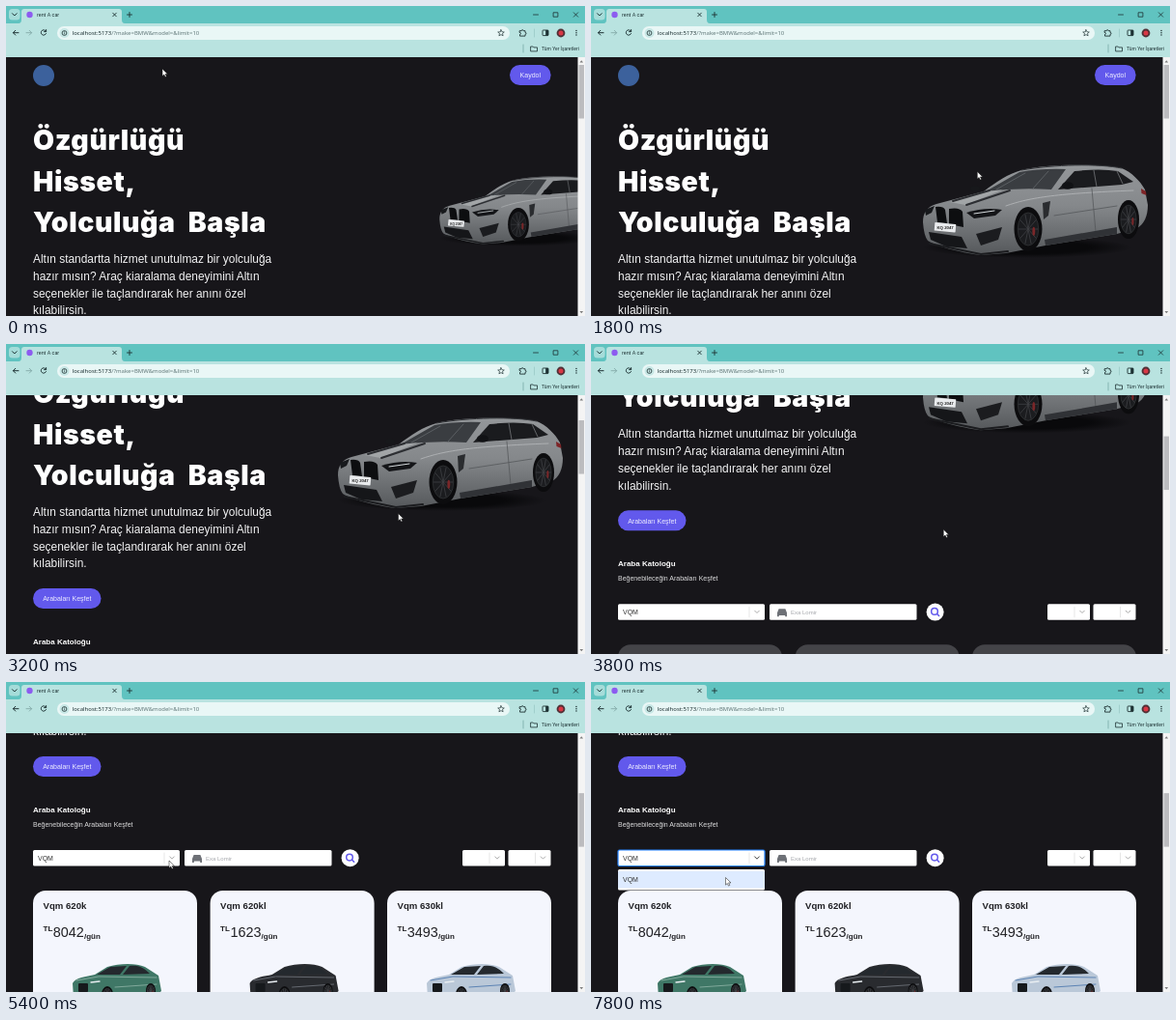
Animation, 600 px wide and 321 px high, one loop 8 s. Source, as an HTML page:

```html
<!DOCTYPE html>
<html lang="tr">
<head>
<meta charset="utf-8">
<title>rent A car</title>
<style>
  html, body { margin: 0; width: 100%; height: 100%; overflow: hidden; background: #17161a; }
  svg { display: block; width: 100%; height: 100%; }
  text { font-family: "Liberation Sans", Arial, sans-serif; white-space: pre; }
  .hero { font-family: Inter, sans-serif; font-weight: 900; letter-spacing: .02em; word-spacing: .24em; }
  .ui { font-family: Roboto, sans-serif; }
  .url { font-family: "Noto Sans", sans-serif; }
  .bold { font-weight: 700; }
  .line { fill: none; stroke-linecap: round; stroke-linejoin: round; }
</style>
</head>
<body>
<svg id="stage" viewBox="0 0 600 321" preserveAspectRatio="none"></svg>
<script>
const LOOP = 8000, STEP = 200;
const DARK = '#17161a', PURPLE = '#6259ec', INK = '#1d3133';

const rect = (x, y, w, h, fill, r = 0, more = '') =>
  `<rect x="${x}" y="${y}" width="${w}" height="${h}" rx="${r}" fill="${fill}" ${more}/>`;
const circle = (x, y, r, fill, more = '') => `<circle cx="${x}" cy="${y}" r="${r}" fill="${fill}" ${more}/>`;
const oval = (x, y, rx, ry, fill, more = '') =>
  `<ellipse cx="${x}" cy="${y}" rx="${rx}" ry="${ry}" fill="${fill}" ${more}/>`;
const shape = (d, fill, more = '') => `<path d="${d}" fill="${fill}" ${more}/>`;
const line = (d, color = INK, width = .9) =>
  `<path class="line" d="${d}" stroke="${color}" stroke-width="${width}"/>`;
const text = (s, x, y, size, fill, cls = '', anchor = 'start') =>
  `<text x="${x}" y="${y}" font-size="${size}" fill="${fill}" class="${cls}" text-anchor="${anchor}">${s}</text>`;
const chevron = (x, y, color, width = 1) => line(`M${x - 2.3} ${y - 1.1}l2.3 2.3 2.3-2.3`, color, width);

function wheel(x, y, rx, ry) {
  let spokes = '';
  for (let i = 0; i < 10; i++) {
    const a = i * Math.PI / 5;
    spokes += `M${x} ${y}l${Math.cos(a) * rx * .68} ${Math.sin(a) * ry * .68}`;
  }
  return oval(x, y, rx, ry, '#0c0c0e') + oval(x, y, rx * .74, ry * .74, '#1b1c1f', 'stroke="#3c3e41" stroke-width=".6"') +
    line(spokes, '#3f4144', .8) + oval(x + rx * .4, y + ry * .1, rx * .1, ry * .2, '#7a2729');
}

function heroCar() {
  return oval(452, 250, 108, 11, 'url(#shadow)') +
    shape('M344 224C344 214 348 208 358 205L407 192C420 182 432 174 446 170C470 164 520 163 550 168C560 172 569 181 574 190L577 206C577 218 573 226 566 230L545 236 471 248 430 256 404 258C380 255 356 248 349 243Q345 238 344 224Z', 'url(#paint)') +
    shape('M409 192L444 172Q466 168 492 169L477 190Q442 188 409 192Z', '#3a3d41') +
    line('M420 190L450 173M458 189L474 171', '#5b5f63', 1) +
    shape('M484 190L501 171Q528 168 546 171L562 182 550 185Z', '#1a1b1e') +
    line('M521 170l3 17M545 171l6 13', '#6b6e71', .9) + line('M446 170C480 164 526 163 550 168', '#34363a', 1) +
    shape('M372 203L409 192 427 190 388 206Z', '#b4b7b9', 'opacity=".6"') +
    line('M375 202L413 191M389 206L434 191', '#2c2e32', 1.9) +
    line('M430 207C455 198 485 194 562 191', '#b6b9bb', .8) + line('M480 217L545 207M519 189l4 45', '#4f5255', .7) +
    shape('M470 242L545 229 545 236 471 248Z', '#303236') +
    shape('M468 204l8-2-2 15-5 4Z', '#2a2c2f') +
    shape('M389 214Q408 208 426 211L419 217 397 220Z', '#141518') + line('M397 215L418 212', '#d5dadd', 1) +
    shape('M346 211l10-4-3 7-6 3Z', '#17191c') +
    shape('M357 208Q365 207 367 211L369 225 359 224ZM371 210Q382 208 385 213L386 229 371 226Z', '#0d0e10') +
    shape('M350 234L384 239 390 251 368 249 352 242Z', '#151619') + shape('M399 236l27-7-4 13-18 6Z', '#1b1c1f') +
    line('M351 246L404 257 432 254', '#1b1c1f', 2) +
    rect(356, 225, 22, 8.5, '#e9ebed', .6, 'transform="rotate(5 367 229)"') +
    text('KQ 2047', 358.5, 231.4, 4.3, '#222', 'bold') +
    oval(494, 186, 6, 3.8, '#111215') + oval(398, 189, 5, 2.4, '#17181b') +
    wheel(453, 231, 14.5, 23) + wheel(557, 221, 11, 20) +
    shape('M570 189l5 3 .5 4-5-2Z', '#7d2326');
}

function sedan(color, trim) {
  return oval(88, 595, 46, 3, '#9299a3', 'opacity=".35"') +
    shape('M41 576C44 570 55 569 64 567L77 559C90 555 107 555 116 559L130 568 133 584 125 591 52 597 42 591Z', color) +
    shape('M66 567L80 559 97 558 90 567ZM93 567L100 558C109 557 114 559 121 566Z', '#24292e') +
    line('M45 573L68 569 128 570M85 580L128 577', trim, 1) +
    rect(47, 576, 10, 9, '#16191c', 1) + line('M60 575l9-1', '#e9eef2', 1.3) +
    wheel(77, 588, 6, 9) + wheel(122, 584, 5, 8);
}

function card(x, name, price, color, trim) {
  return `<g transform="translate(${x})">` + rect(0, 480, 170, 190, '#f4f6fd', 13) +
    text(name, 10.5, 499.2, 9.6, '#202024', 'bold') + text('TL', 10.5, 522, 8, '#202024', 'bold') +
    text(price, 20.8, 528, 14.4, '#202024') + text('/gün', 53, 530, 8, '#202024', 'bold') +
    sedan(color, trim) + '</g>';
}

function select(x, w, label = '') {
  return rect(x, 438, w, 16.5, '#fff', 1.5) + line(`M${x + w - 16} 441v10.5`, '#ccc', .5) +
    chevron(x + w - 8, 446, '#aaa') + text(label, 33, 449, 7, '#333');
}

function page() {
  return circle(39, 72, 11, '#3c619c') +
    rect(522, 61, 42.6, 21, PURPLE, 10.5) + text('Kaydol', 543.3, 74.2, 7, '#eeedff', '', 'middle') +
    ['Özgürlüğü', 'Hisset,', 'Yolculuğa Başla'].map((s, i) => text(s, 28, 149.3 + i * 42.3, 28.5, '#fff', 'hero')).join('') +
    ['Altın standartta hizmet unutulmaz bir yolculuğa', 'hazır mısın? Araç kiaralama deneyimini Altın',
      'seçenekler ile taçlandırarak her anını özel', 'kılabilirsin.']
      .map((s, i) => text(s, 28, 266 + i * 17.8, 11.93, '#f3f3f4')).join('') +
    `<g id="car">${heroCar()}</g>` +
    rect(28, 341, 70.5, 21, PURPLE, 10.5) + text('Arabaları Keşfet', 63.3, 354.3, 7, '#eeedff', '', 'middle') +
    text('Araba Katoloğu', 28, 398.6, 8, '#fff', 'bold') +
    text('Beğenebileceğin Arabaları Keşfet', 28, 413.6, 7, '#dededf') +
    select(28, 152, 'VQM') + rect(185, 438, 152.5, 16.5, '#fff', 1.5) +
    shape('M193 447l1.6-4h6.8l1.6 4v4h-1.8v-1.4h-6.4v1.4h-1.8Z', '#6d7076') +
    text('Exa Lomir', 207, 448.5, 6, '#a5a7ac') +
    circle(356.6, 446.2, 9, '#fff') + circle(356, 445.6, 3.3, 'none', `stroke="${PURPLE}" stroke-width="1.5"`) +
    line('M358.6 448.2l2 2', PURPLE, 1.6) +
    select(473, 44) + select(520.5, 44) +
    `<g id="cards">${card(28, 'Vqm 620k', 8042, '#3f7766', '#80a99b')}${
      card(211.6, 'Vqm 620kl', 1623, '#292b2f', '#656970')}${
      card(395, 'Vqm 630kl', 3493, '#bac8d8', '#5c83b4')}</g>` +
    '<g id="menu">' + rect(28, 438, 152, 16.5, 'none', 1.5, 'stroke="#2684ff" stroke-width="1.2"') +
    chevron(172, 446, '#555') + rect(28, 458, 152, 21.5, '#fff', 1.5) + rect(28, 460, 152, 17.5, '#deebff') +
    text('VQM', 33, 471.3, 7, '#333') + '</g>';
}

function browser() {
  return rect(0, 0, 600, 18, '#60c3c0') + rect(0, 18, 600, 35, '#b9e3e0') +
    rect(3, 3, 11.5, 11.5, '#a5dcd9', 3.5) + chevron(8.8, 8.8, INK) +
    shape('M13 18Q16 18 16 14V6Q16 3 19 3H117Q120 3 120 6V14Q120 18 123 18Z', '#b9e3e0') +
    circle(24.5, 9, 3.2, '#8c5cf0') + text('rent A car', 32, 11, 5.4, INK, 'ui') +
    line('M110.7 7.2l3.6 3.6m0-3.6l-3.6 3.6M125.5 9h5M128 6.5v5', INK) +
    line('M546.5 9h5M588.3 6.8l4.4 4.4m0-4.4l-4.4 4.4M567.5 6.8h4.4v4.4h-4.4Z', INK, .8) +
    line('M13 27.7H7.5m2.3-2.4l-2.4 2.4 2.4 2.4', INK, 1) + line('M21 27.7h5.5m-2.3-2.4l2.4 2.4-2.4 2.4', '#83aaa9') +
    line('M41.3 26A2.7 2.7 0 1 0 41.5 28.6M41.6 24.6v2h-2', INK, 1) +
    rect(53, 21, 469, 14, '#e9f7f6', 7) + circle(60.5, 28, 5, '#c8e8e6') +
    circle(60.5, 28, 2.4, 'none', `stroke="${INK}" stroke-width=".8"`) + line('M60.5 27.8v1.2M60.5 26.7v.1', INK, .6) +
    text('localhost:5173<tspan fill="#617879">/?make=BMW&amp;model=&amp;limit=10</tspan>', 68.7, 30.2, 5.97, INK, 'url') +
    line('M513 24.7l1 2.1 2.3.2-1.8 1.5.6 2.3-2.1-1.2-2.1 1.2.6-2.3-1.8-1.5 2.3-.2Z', INK, .7) +
    line('M532.5 25.7h1.7a1 1 0 0 1 2 0h1.8v1.7a1 1 0 0 1 0 2v1.7h-5.5v-1.7a1 1 0 0 0 0-2Z') +
    line('M547.5 24v8', '#86b9b6', .5) +
    rect(556, 25, 6, 5.6, 'none', .7, `stroke="${INK}" stroke-width=".9"`) + rect(559.2, 25, 2.8, 5.6, INK) +
    circle(575, 28, 4.4, '#513238') + circle(575, 28, 2.5, '#d83845') +
    [25.5, 27.8, 30.1].map(y => circle(591, y, .75, INK)).join('') +
    line('M536 40v8', '#5f9794', .6) +
    line('M544 42h2.2l.8.9h3.5v4h-6.5Z', INK, .8) + text('Tüm Yer İşaretleri', 555, 46, 5, INK, 'ui');
}

const stage = document.getElementById('stage');
stage.innerHTML = '<defs><linearGradient id="paint" x2="0" y2="1"><stop stop-color="#94979a"/>' +
  '<stop offset=".45" stop-color="#85888b"/><stop offset="1" stop-color="#55585b"/></linearGradient>' +
  '<radialGradient id="shadow"><stop offset=".6" stop-color="#09090b"/>' +
  '<stop offset="1" stop-color="#09090b" stop-opacity="0"/></radialGradient></defs>' +
  rect(0, 0, 600, 321, DARK) + `<g id="page">${page()}</g>` +
  rect(592.5, 53, 7.5, 268, '#f4f4f4') + rect(593.6, 61, 5.4, 55.5, '#bcbcbf', 0, 'id="thumb"') +
  shape('M594.5 58.5l1.8-2.2 1.8 2.2ZM594.5 316l1.8 2.2 1.8-2.2Z', '#7c7c7c') + browser() +
  shape('M0 0V7.6L1.8 6 3 8.6 4.3 8 3.1 5.4H5.5Z', '#fff', 'id="cursor" stroke="#111" stroke-width=".5"');

const [pageEl, car, cards, menu, thumb, cursor] =
  ['page', 'car', 'cards', 'menu', 'thumb', 'cursor'].map(id => document.getElementById(id));

const smooth = p => (1 - Math.cos(Math.PI * p)) / 2;

// Each key is [time, ...values]; values ease between neighbouring keys.
function track(keys, t) {
  const next = keys.findIndex(k => k[0] > t);
  if (next < 0) return keys[keys.length - 1].slice(1);
  if (next === 0) return keys[0].slice(1);
  const a = keys[next - 1], b = keys[next], p = smooth((t - a[0]) / (b[0] - a[0]));
  return a.slice(1).map((v, i) => v + (b[i + 1] - v) * p);
}

const scrollKeys = [[2700, 0], [3150, 88], [3400, 88], [4100, 220], [4400, 220], [4750, 264]];
const cursorKeys = [[0, 162, 65], [1000, 338.7, 135.5], [1800, 400.3, 171.5], [2600, 406.5, 175.5],
  [3400, 406.5, 175.5], [4200, 324, 208.5], [5400, 169, 185], [6400, 169, 185], [7600, 139.5, 202.5]];
const fadeKeys = [[3600, 0], [4200, .81], [4600, 1]];

function draw(now) {
  const t = Math.floor(now % LOOP / STEP) * STEP;
  const [scroll] = track(scrollKeys, t);
  const away = 1 - smooth(Math.min(t / 1550, 1));
  pageEl.setAttribute('transform', `translate(0 ${-scroll})`);
  thumb.setAttribute('y', 61 + scroll * .205);
  car.setAttribute('transform', `translate(${465 + 75 * away} 212) scale(${1 - .25 * away}) translate(-465 -212)`);
  cards.setAttribute('opacity', track(fadeKeys, t)[0]);
  menu.setAttribute('visibility', t >= 6200 ? 'visible' : 'hidden');
  cursor.setAttribute('transform', `translate(${track(cursorKeys, t)})`);
}

const start = performance.now();
function tick() {
  draw(performance.now() - start);
  requestAnimationFrame(tick);
}
tick();
</script>
</body>
</html>
```
